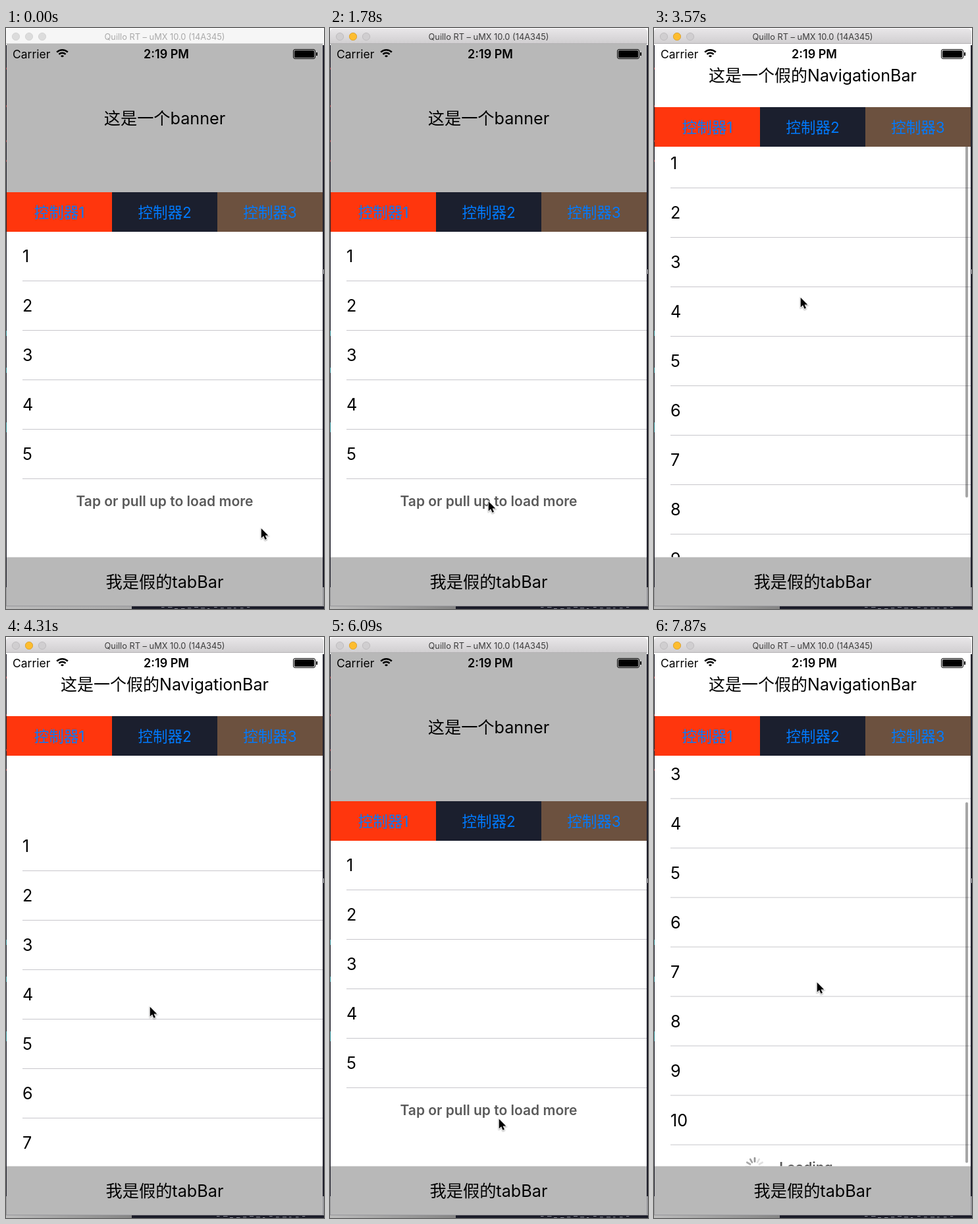
An HTML page with a canvas that plays this animation: 483 by 881 pixels, repeating every 8 s.

```html
<!DOCTYPE html>
<html lang="zh-CN">
<head>
<meta charset="utf-8">
<title>Nested scrolling</title>
<style>
html, body { margin: 0; width: 100%; height: 100%; overflow: hidden; background: #fff; }
canvas { display: block; width: 483px; height: 881px; }
</style>
</head>
<body>
<canvas id="stage" width="483" height="881"></canvas>
<script>
const ctx = document.getElementById('stage').getContext('2d');
const LOOP = 8000, STEP = 148.5;
const GREY = '#b8b8b8', LEFT = 1, WIDTH = 480, MID = 241;
const TOP = 24, NAV = 120, BAR = 802.5, BOTTOM = 876, ROW = 75, FOLD = 129;
const FAMILY = 'Inter, "Noto Sans CJK SC", "Noto Sans CJK", sans-serif';

// Gestures: start step, end step, destination.
const moves = [
  [0, 11, 240, 717], [15, 17, 238, 290], [19, 24, 222, 408], [24, 28, 218, 560],
  [30, 35, 250, 132], [35, 41, 256, 730], [49, 53, 247, 523]
];
const pulls = [
  [16, 19, 240], [21, 24, 141], [24, 27, 29], [32, 34, FOLD], [34.65, 40, 0], [49, 53, 288.5]
];

const within = (n, a, b) => n >= a && n < b;
const clamp = (v, lo, hi) => Math.max(lo, Math.min(hi, v));

function ease(n, a, b) {
  const p = clamp((n - a) / (b - a), 0, 1);
  return p * p * (3 - 2 * p);
}

function follow(legs, n, from) {
  return legs.reduce((v, [a, b, ...to]) => v.map((c, i) => c + (to[i] - c) * ease(n, a, b)), from);
}

function random(seed) {
  return () => (seed = seed * 16807 % 2147483647) / 2147483647;
}

function rect(color, x, y, w, h) {
  ctx.fillStyle = color;
  ctx.fillRect(x, y, w, h);
}

function pill(color, x, y, w, h, r) {
  ctx.beginPath();
  ctx.roundRect(x, y, w, h, r);
  ctx.fillStyle = color;
  ctx.fill();
}

function light(color, edge, x) {
  ctx.beginPath();
  ctx.arc(x, 13, 5.6, 0, Math.PI * 2);
  ctx.fillStyle = color;
  ctx.fill();
  ctx.strokeStyle = edge;
  ctx.lineWidth = 0.8;
  ctx.stroke();
}

function text(s, x, y, size, color = '#000', align = 'center', weight = 400) {
  ctx.font = `${weight} ${size}px ${FAMILY}`;
  ctx.textAlign = align;
  ctx.fillStyle = color;
  ctx.fillText(s, x, y);
}

function clipped(y, h, draw) {
  ctx.save();
  ctx.beginPath();
  ctx.rect(LEFT, y, WIDTH, h);
  ctx.clip();
  draw();
  ctx.restore();
}

function desktop(active) {
  const rnd = random(71);
  rect('#fff', 0, 0, 483, 881);
  rect('#20202c', 0, 26, 483, 822);
  rect('#96969a', 0, 848, 483, 33);
  for (let i = 0; i < 4; i++) {
    rect('#8a3038', 0, 60 + rnd() * 170 | 0, 1, 3);
    rect('#2b8791', 0, 380 + rnd() * 400 | 0, 1, 8);
  }
  rect('#d8d8dc', 482, 366, 1, 7);
  const shade = ctx.createLinearGradient(0, 0, 191, 0);
  shade.addColorStop(0, '#bcbcbc');
  shade.addColorStop(1, active ? '#858585' : '#a9a9a9');
  rect(shade, 0, 877, 191, 4);
  rect('#1c1d2a', 191, 877, 292, 4);
  const from = active ? 320 : 236;
  for (let x = from; x < from + 140; x += 10) rect('#8b8d98', x, 878 + rnd() * 3 | 0, 3 + rnd() * 4, 1);
}

function titleBar(active) {
  const fill = ctx.createLinearGradient(0, 1, 0, 24);
  fill.addColorStop(0, active ? '#e8e6e8' : '#f6f6f6');
  fill.addColorStop(1, active ? '#d0ced0' : '#f6f6f6');
  pill(fill, 0, 1, 482, 23, [5, 5, 0, 0]);
  rect(active ? '#b4b2b4' : '#d4d4d4', 0, 23, 482, 1);
  const idle = active ? '#d0ced0' : '#dcdcdc', edge = active ? '#b9b7b9' : '#cfcfcf';
  for (const x of [15, 35, 55]) light(idle, edge, x);
  if (active) light('#fdbd2f', '#dfa023', 35);
  text('Quillo RT – uMX 10.0 (14A345)', MID, 18, 12.8, active ? '#3c3c3c' : '#a9a9a9');
}

function statusBar() {
  text('Carrier', 10, 46, 17.5, '#000', 'left');
  text('2:19 PM', 243.5, 46, 18, '#000', 'center', 600);
  ctx.strokeStyle = '#000';
  ctx.lineWidth = 2.5;
  for (const r of [2.3, 7.2, 11.8]) {
    ctx.beginPath();
    ctx.arc(85.5, 45, r, -Math.PI * 0.75, -Math.PI * 0.25);
    ctx.stroke();
  }
  ctx.lineWidth = 1;
  ctx.beginPath();
  ctx.roundRect(436.5, 32.5, 33, 14, 2.5);
  ctx.stroke();
  pill('#000', 438, 34, 30, 11, 1.5);
  rect('#000', 471, 37, 2, 5);
}

function header(offset) {
  const y = 249 - offset;
  rect(GREY, LEFT, TOP, WIDTH, y - TOP);
  clipped(TOP, y - TOP, () => text('这是一个banner', MID, 145.5 - offset, 25.2));
  ['#ff360d', '#1b1f2e', '#6c513f'].forEach((color, i) => {
    rect(color, LEFT + i * 160, y, 160, 60);
    text('控制器' + (i + 1), 81 + i * 160, y + 39, 22.5, '#007aff');
  });
  ctx.globalAlpha = offset / FOLD;
  rect('#fff', LEFT, TOP, WIDTH, NAV - TOP);
  text('这是一个假的NavigationBar', MID, 81, 25);
  ctx.globalAlpha = 1;
}

function spinner(x, y, n) {
  ctx.save();
  ctx.translate(x, y);
  ctx.lineWidth = 2.7;
  ctx.lineCap = 'round';
  for (let i = 0; i < 12; i++) {
    const age = (n * 2 + 14 - i) % 12;
    const shade = Math.round(150 + Math.min(age, 7) * 10.5);
    ctx.strokeStyle = `rgb(${shade},${shade},${shade})`;
    ctx.beginPath();
    const a = i * Math.PI / 6 - Math.PI / 2, cos = Math.cos(a), sin = Math.sin(a);
    ctx.moveTo(cos * 8, sin * 8);
    ctx.lineTo(cos * 13.5, sin * 13.5);
    ctx.stroke();
  }
  ctx.restore();
}

function table(n, top, pos) {
  const count = within(n, 18, 32) || n >= 45 ? 10 : 5;
  const loading = within(n, 15, 18) || within(n, 43, 45) || n >= 52;
  const end = top - pos + count * ROW;
  clipped(top, BAR - top, () => {
    for (let i = 0; i < count; i++) {
      const y = top - pos + i * ROW;
      text(i + 1, 25, y + 46, 25.2, '#000', 'left');
      rect('#c8c7cc', 25, y + 74, 456, 1);
    }
    text(loading ? 'Loading...' : 'Tap or pull up to load more', MID, end + 41, 21, '#5a5a5a', 'center', 600);
    if (loading) spinner(153, end + 33, n);
    if (count === 10 && pos > 0) pill('rgba(0,0,0,.35)', 473, 158 + pos * 0.58, 4, 547, 2);
  });
}

function tabBar() {
  rect(GREY, LEFT, BAR, WIDTH, BOTTOM - BAR);
  text('我是假的tabBar', MID, 848.5, 25.2);
}

function arrow(x, y) {
  const p = new Path2D('M0 0V14.6L3.4 11.5L5.8 17L8.3 15.9L5.9 10.6H10.6Z');
  ctx.save();
  ctx.translate(x + 0.7, y + 0.8);
  ctx.lineWidth = 1.7;
  ctx.strokeStyle = '#fff';
  ctx.shadowColor = 'rgba(0,0,0,.4)';
  ctx.shadowBlur = 2;
  ctx.shadowOffsetY = 1;
  ctx.stroke(p);
  ctx.shadowColor = 'transparent';
  ctx.fillStyle = '#000';
  ctx.fill(p);
  ctx.restore();
}

// The picture rests during a few stretches.
function stepAt(t) {
  const n = Math.min(53, Math.floor((t + 8) / STEP));
  const rest = [[12, 15], [19, 21], [46, 49]].find(([a, b]) => within(n, a, b));
  return rest ? rest[0] : n;
}

function draw(n) {
  const active = n >= 6;
  const [pull] = follow(pulls, n, [0]);
  const pinned = within(n, 19, 35);
  const offset = pinned ? FOLD : clamp(pull, 0, FOLD);
  desktop(active);
  titleBar(active);
  rect('#fff', LEFT, TOP, WIDTH, BOTTOM - TOP);
  table(n, 309 - offset, pull - offset);
  header(offset);
  statusBar();
  tabBar();
  arrow(...follow(moves, n, [387, 758]));
}

const start = performance.now();
function tick() {
  draw(stepAt((performance.now() - start) % LOOP));
  requestAnimationFrame(tick);
}
tick();
</script>
</body>
</html>
```
